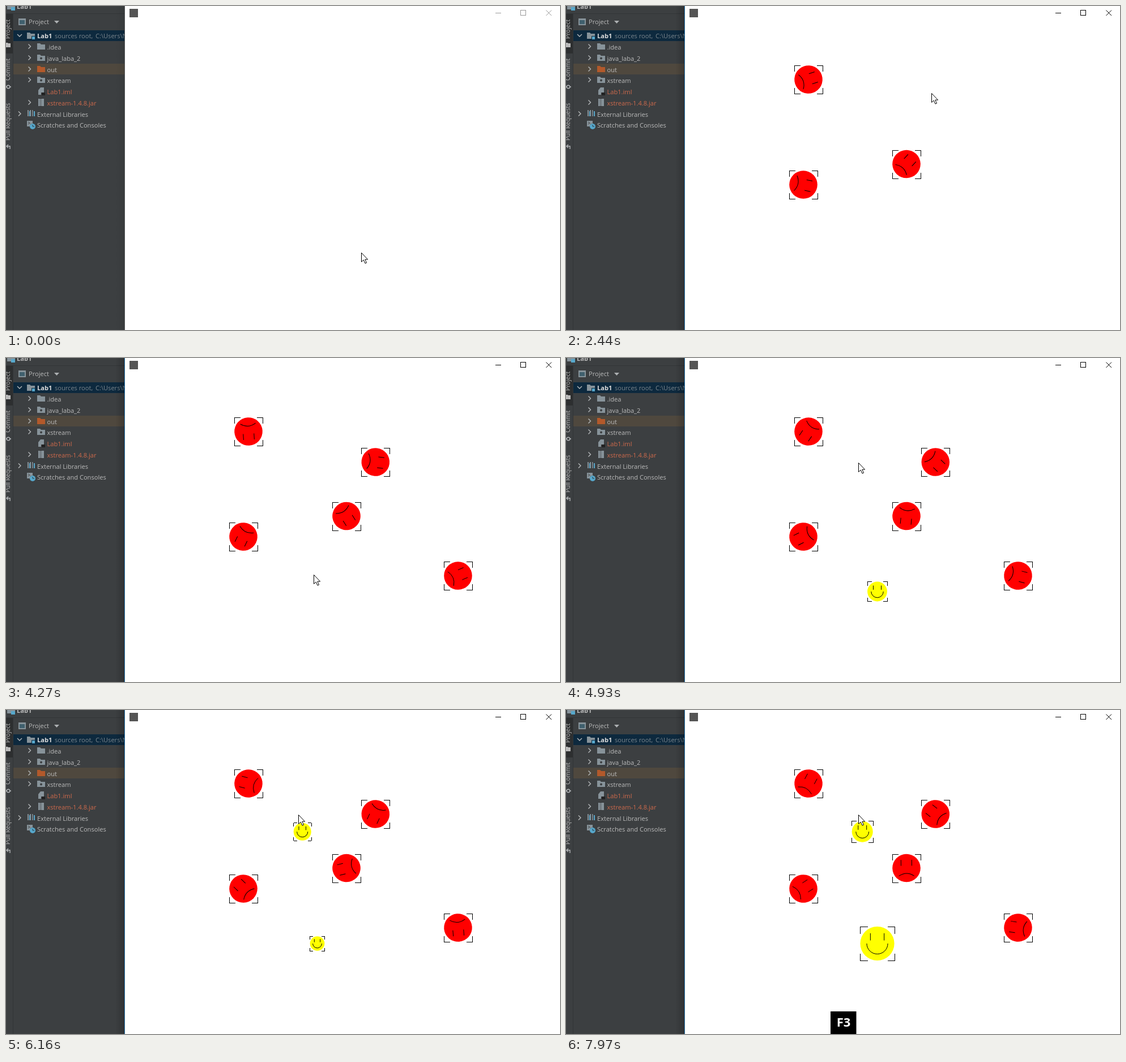
Write an HTML page that moves like this. It is 978 px wide and 573 px high and loops after 8000 ms.

```html
<!DOCTYPE html>
<html lang="en">
<head>
<meta charset="utf-8">
<title>Faces</title>
<style>
html, body { margin: 0; width: 100%; height: 100%; overflow: hidden; background: #fff; }
svg { display: block; width: 978px; height: 573px; font: 11.1px "Open Sans", "Noto Sans", sans-serif; fill: #bbb; }
.line { fill: none; stroke: #000; vector-effect: non-scaling-stroke; }
.crisp { shape-rendering: crispEdges; }
.chev { fill: none; stroke: #b4b7b9; stroke-width: 1.4; }
.side { font-size: 10.6px; }
</style>
</head>
<body>
<svg id="stage" viewBox="0 0 978 573">
  <defs>
    <path id="folder" d="M0 0h5l2 2h7v9H0z"/>
    <clipPath id="panel"><path d="M0 0h209v573H0z"/></clipPath>
    <linearGradient id="fade">
      <stop offset="0" stop-opacity="0"/>
      <stop offset="1" stop-opacity=".2"/>
    </linearGradient>
  </defs>
  <path fill="#3c3f41" d="M0 0h210v573H0z"/>
  <g clip-path="url(#panel)">
    <path fill="#2d2f30" d="M0 14h12v70H0z"/>
    <path fill="#323537" d="M0 13h209v1H0zM12 14h1v559h-1z"/>
    <path fill="#0d293e" d="M13 43h196v19H13z"/>
    <path fill="#4f483e" d="M13 102h196v19H13z"/>
    <use href="#folder" x="2" y="-5" fill="#87939a"/>
    <path fill="#57a8cc" d="M9 2h7v6H9z"/>
    <text x="19" y="5" font-weight="700">Lab1</text>

    <path fill="#87939a" d="M22 22h13v12H22z"/>
    <path fill="#40606e" d="M24 25h9v7h-9z"/>
    <text x="40" y="32">Project</text>
    <path fill="#adb0b2" d="M85 26h9l-4.500 5z"/>

    <g class="side">
      <text transform="translate(7 58)rotate(-90)">Project</text>
      <text transform="translate(7 132)rotate(-90)">Commit</text>
      <text transform="translate(7 238)rotate(-90)">Pull Requests</text>
    </g>
    <path d="M0 65h3l1 1h4v7H0z"/>
    <circle class="chev" cx="4" cy="143" r="2.800"/>
    <path class="chev" d="M0 143h1M7 143h2M2 248h5v5M4 245l-3 3 3 3"/>

    <path class="chev" d="M20 50l4 4 4-4"/>
    <use href="#folder" x="37" y="47" fill="#87939a"/>
    <path fill="#57a8cc" stroke="#0d293e" d="M45.500 53.500h6v6h-6z"/>
    <text x="55" y="57" font-weight="700" fill="#ddd">Lab1</text>
    <text x="86" y="57" fill="#7c868d">sources root,</text>
    <text x="158" y="57" fill="#7c868d">C:\Users\Nora</text>
    <g id="tree"></g>

    <g fill="#87939a">
      <path d="M57 149l4-5h6v9h-5v4h-5z"/>
      <path fill="#222" d="M63 153h6v5h-6z"/>
      <path d="M57 164h10v13H57z"/>
      <path d="M38 184h2v11h-2zM42 184h2v11h-2zM46 184h1.500v11H46z"/>
      <path fill="#57a8cc" d="M41 186h1.500v9H41zM49 186h2v9h-2z"/>
      <path d="M37 203h10v10H37z"/>
      <path fill="none" stroke="#3c3f41" d="M39 205l3 2-3 2M43 209h3"/>
      <circle cx="47" cy="213" r="5" fill="#57a8cc"/>
      <path fill="none" stroke="#2b3b44" d="M47 210v3h3"/>
      <path fill="none" stroke="#3c3f41" stroke-dasharray="1 1" d="M62 164v13M60 164v13"/>
    </g>
  </g>

  <path id="shadow" fill="url(#fade)" d="M193 0h16v573h-16z"/>
  <path fill="#fff" d="M210 0h768v573H210z"/>
  <path id="edge" class="crisp" d="M209 0h1v573h-1z"/>
  <path fill="#555" d="M218 5h15v15h-15z"/>
  <g id="buttons" fill="none">
    <path class="crisp" d="M864 12.500h10M908.500 7.500h9v9h-9z"/>
    <path d="M953.500 7.500l9.500 9.500M963 7.500l-9.500 9.500"/>
  </g>
  <g id="faces"></g>
  <g id="badge">
    <path id="plate" fill="#000"/>
    <text id="key" y="560" text-anchor="middle" font-size="22" font-weight="700" fill="#fff"></text>
  </g>
  <path id="cursor" fill="#fff" stroke="#000" d="M.5.5v16l3.700-3.400 2.800 6.100 2.500-1.100-2.700-5.900h4.800z"/>
</svg>
<script>
const LOOP = 8000, SPIN = 0.0572;   // degrees per ms
const $ = id => document.getElementById(id);
const set = (el, name, value) => el.setAttribute(name, value);

// label, indent, colour of the text, colour of the folder
const rows = [
  [".idea", 1, "#bbb", "#87939a"], ["java_laba_2", 1, "#bbb", "#87939a"],
  ["out", 1, "#bbb", "#b3592b"], ["xstream", 1, "#bbb", "#87939a"],
  ["Lab1.iml", 1, "#cf6a4c"], ["xstream-1.4.8.jar", 1, "#cf6a4c"],
  ["External Libraries", 0, "#bbb"], ["Scratches and Consoles", 0, "#bbb"]
];
const leaves = ["Lab1.iml", "Scratches and Consoles"];
const packages = ["java_laba_2", "xstream"];

$("tree").innerHTML = rows.map(([label, indent, color, folder], i) => {
  const x = 55 + indent * 17.5, y = Math.round(72.3 + i * 19.7);
  return `<text x="${x}" y="${y + 4.5}" fill="${color}">${label}</text>`
    + (leaves.includes(label) ? "" : `<path class="chev" d="M${x - 33} ${y - 4.5}l4 4-4 4"/>`)
    + (folder ? `<use href="#folder" x="55" y="${y - 6}" fill="${folder}"/>` : "")
    + (packages.includes(label) ? `<circle cx="62" cy="${y + 0.5}" r="2" fill="#3c3f41"/>` : "");
}).join("");

// spans in which the picture stands still
const holds = [[340, 670], [1240, 1390], [3400, 3550], [3870, 4020]];

// time, x, y of the pointer tip
const path = [
  [40, 627, 436], [340, 412, 286], [700, 412, 286], [1080, 421, 100],
  [1190, 421, 100], [1390, 564, 222], [1500, 594, 249], [1700, 594, 249],
  [2120, 645, 154], [2575, 645, 154], [3000, 791, 355], [3095, 791, 355],
  [3400, 565, 436], [3570, 564, 436], [3870, 543, 383], [4320, 543, 383],
  [4800, 516, 185]
];

const faces = [
  { x: 419, y: 316, born: 670 },
  { x: 428, y: 130, born: 1187 },
  { x: 601, y: 279.500, born: 1690 },
  { x: 652.300, y: 184, born: 2575 },
  { x: 798, y: 385, born: 3095 },
  { x: 549.500, y: 413, born: 4315, happy: true },
  { x: 523.200, y: 215.200, born: 5330, happy: true }
];

const sad = "M-9.500-14.500v10.500M9.500-14.500v10.500M-13.500 14Q0 5 13.500 14";
const glad = "M-10-15v10.500M10-15v10.500M-15.300 0A15.300 15.300 0 0 0 15.300 0";
const corners = [0, 90, 180, 270].map(a =>
  `<path class="line crisp" transform="rotate(${a})" d="M-25-14.500V-25h10.500"/>`).join("");

for (const f of faces) {
  f.el = document.createElementNS("http://www.w3.org/2000/svg", "g");
  f.el.innerHTML = `<g>
    <circle r="24.800" fill="${f.happy ? "#ff0" : "#f00"}"/>
    <path class="line" d="${f.happy ? glad : sad}"/></g>
    <g transform="translate(.5 .5)">${corners}</g>`;
  $("faces").append(f.el);
}

function pointer(t) {
  const i = path.findIndex(p => p[0] > t);
  if (i === 0) return path[0].slice(1);
  if (i < 0) return path.at(-1).slice(1);
  const [t0, x0, y0] = path[i - 1], [t1, x1, y1] = path[i];
  const k = (t - t0) / (t1 - t0);
  return [x0 + (x1 - x0) * k, y0 + (y1 - y0) * k];
}

function draw(t) {
  const hold = holds.find(([a, b]) => t >= a && t < b);
  if (hold) t = hold[0];

  const active = t >= 670;
  set($("edge"), "fill", active ? "#2878b4" : "#55585a");
  set($("shadow"), "opacity", active ? 1 : 0.3);
  set($("buttons"), "stroke", active ? "#000" : "#999");

  for (const f of faces) {
    const angle = (t - f.born) * SPIN;
    const size = f.happy ? 49 - 24 * Math.sin(angle * Math.PI / 180) : 50;
    set(f.el, "visibility", t >= f.born ? "visible" : "hidden");
    set(f.el, "transform", `translate(${f.x} ${f.y}) scale(${size / 50})`);
    if (!f.happy) set(f.el.firstChild, "transform", `rotate(${angle})`);
  }

  const second = t >= 7480, left = second ? 467 : 469;
  set($("badge"), "visibility", t >= 6700 ? "visible" : "hidden");
  set($("plate"), "d", `M${left} 533H512.500V573H${left}z`);
  set($("key"), "x", (left + 513) / 2);
  $("key").textContent = second ? "F3" : "F1";

  set($("cursor"), "transform", `translate(${pointer(t).map(Math.round)})`);
}

const start = performance.now();
function tick() {
  draw((performance.now() - start) % LOOP);
  requestAnimationFrame(tick);
}
tick();
</script>
</body>
</html>
```
